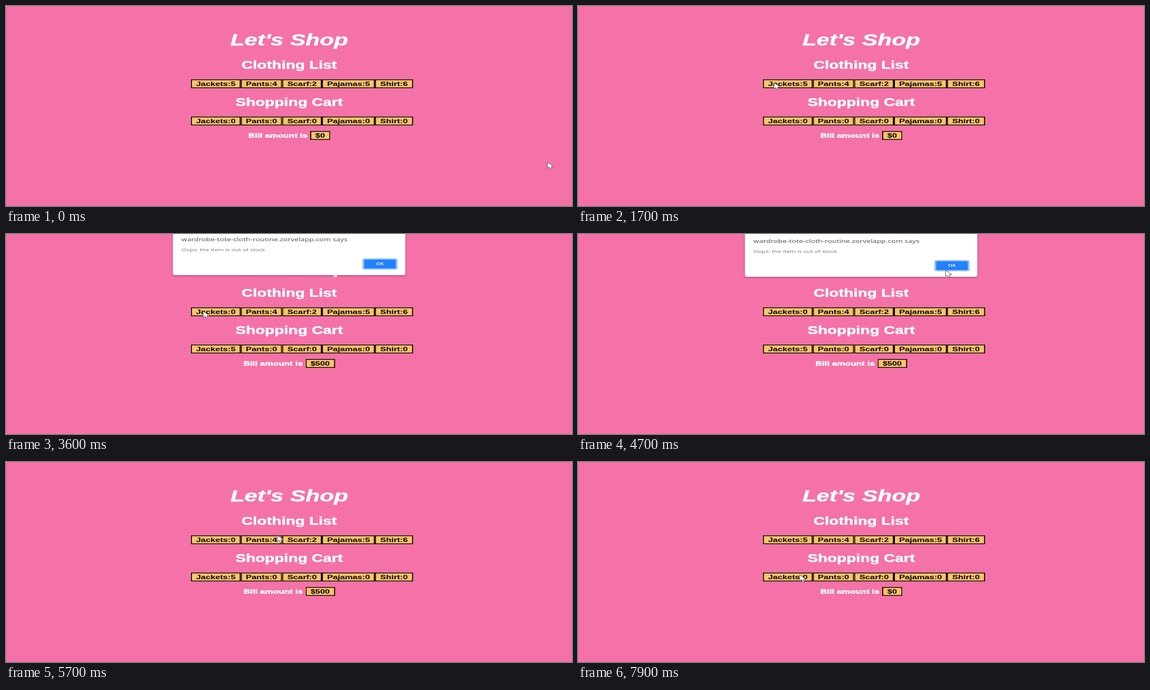
Animation of 1016x360 px, one loop 8 s. Source, as an HTML page without scripts:

```html
<!DOCTYPE html>
<html lang="en">
<head>
<meta charset="utf-8">
<title>Let's Shop</title>
<style>
  @property --n { syntax: "<integer>"; inherits: true; initial-value: 0; }

  html, body { margin: 0; width: 100%; height: 100%; overflow: hidden; background: #f472a8; }

  /* The whole page is shown 1.4 times wider than tall, a little soft */
  main {
    position: absolute; left: 0; top: 0;
    width: 725.714px; height: 360px;
    transform: scaleX(1.4); transform-origin: 0 0;
    filter: blur(.35px);
    font: bold 11.1px/16px "Liberation Sans", Arial, sans-serif;
    color: #fff; white-space: nowrap;
    animation: clicks 8s step-end infinite;
    counter-reset: stock calc(5 - var(--n)) cart var(--n) bill calc(100 * var(--n));
  }
  h1, h2, .row, .total { position: absolute; margin: 0; }
  h1, h2, .total { left: .3px; width: 100%; text-align: center; -webkit-text-stroke: .45px #fff; }
  h1 { top: 46px; font: italic bold 29.8px/30px "Liberation Sans", Arial, sans-serif; }
  h2 { font-size: 20px; line-height: 20px; }
  .row { left: 237.1px; display: flex; }
  .total { top: 225px; display: flex; justify-content: center; gap: 3.3px; font-size: 11.6px; }
  .cell {
    padding: 0 6.63px; height: 16px; font-size: 11.1px;
    color: #111; background: #fec368;
    -webkit-text-stroke: .15px #111;
    box-shadow: inset 0 0 0 1.4px #111;
  }
  .stock::after { content: counter(stock); }
  .cart::after { content: counter(cart); }
  .bill::after { content: "$" counter(bill); }

  .alert {
    position: absolute; left: 214.1px; top: 0; width: 297.7px; height: 77px;
    background: #fff; border-radius: 0 0 3px 3px;
    box-shadow: 0 1px 3px rgba(60, 0, 30, .4);
    font: 7.9px/10px "Open Sans", "Noto Sans", sans-serif; color: #727276;
    visibility: hidden;
    animation: alert 8s step-end infinite;
  }
  .alert * { position: absolute; margin: 0; }
  .site { left: 10.8px; top: 7.2px; font-size: 9.5px; line-height: 12px; color: #4b4b50; }
  .note { left: 10.8px; top: 25.6px; }
  .ok {
    left: 245px; top: 49px; width: 40.7px; height: 16px;
    border-radius: 1.5px; background: #2382fa;
    box-shadow: 0 0 0 .8px #d6e8fd, 0 0 0 1.7px #4a98f7;
    color: #fff; font-size: 7px; font-weight: 600; line-height: 16px; text-align: center;
  }

  .pointer {
    position: absolute; left: 0; top: 0; width: 14px; height: 16px; overflow: visible;
    fill: #fff; stroke: #5a4a52; stroke-width: .9; stroke-linejoin: round;
    animation: pointer 8s ease-in-out infinite;
  }

  @keyframes clicks {
    0% { --n: 0; }
    23.75% { --n: 1; }
    27.5% { --n: 2; }
    31.25% { --n: 3; }
    35% { --n: 4; }
    38.75% { --n: 5; }
    87.5% { --n: 4; }
    90% { --n: 3; }
    92.5% { --n: 2; }
    95% { --n: 1; }
    98.75%, 100% { --n: 0; }
  }
  @keyframes alert {
    0% { visibility: hidden; transform: none; }
    43.75% { visibility: visible; transform: translateY(-16px); }
    45% { visibility: visible; transform: translateY(-3px); }
    46.25% { visibility: visible; transform: none; }
    66.25%, 100% { visibility: hidden; transform: none; }
  }
  @keyframes pointer {
    0%, 1.25% { transform: translate(972px, 281px); }
    16.25%, 21.25% { transform: translate(352px, 138px); }
    40%, 48.75% { transform: translate(354px, 139px); }
    57.5%, 66.25% { transform: translate(660px, 65px); }
    71.25% { transform: translate(487px, 132px); }
    81.25%, 100% { transform: translate(398px, 203px); }
  }
</style>
</head>
<body>
<main>
  <h1>Let's Shop</h1>

  <h2 style="top:96px">Clothing List</h2>
  <div class="row" style="top:132px">
    <span class="cell stock">Jackets:</span>
    <span class="cell">Pants:4</span>
    <span class="cell">Scarf:2</span>
    <span class="cell">Pajamas:5</span>
    <span class="cell">Shirt:6</span>
  </div>

  <h2 style="top:163px">Shopping Cart</h2>
  <div class="row" style="top:199px">
    <span class="cell cart">Jackets:</span>
    <span class="cell">Pants:0</span>
    <span class="cell">Scarf:0</span>
    <span class="cell">Pajamas:0</span>
    <span class="cell">Shirt:0</span>
  </div>

  <div class="total"><span>Bill amount is</span><span class="cell bill"></span></div>

  <div class="alert">
    <p class="site">wardrobe-tote-cloth-routine.zorvelapp.com says</p>
    <p class="note">Oops: the item is out of stock</p>
    <div class="ok">OK</div>
  </div>
</main>
<svg class="pointer" viewBox="0 0 14 16"><path d="M0 0V11.2L3.4 8.9 5.4 12.6 8 11.8 6.2 8.2H11Z"/></svg>
</body>
</html>
```
